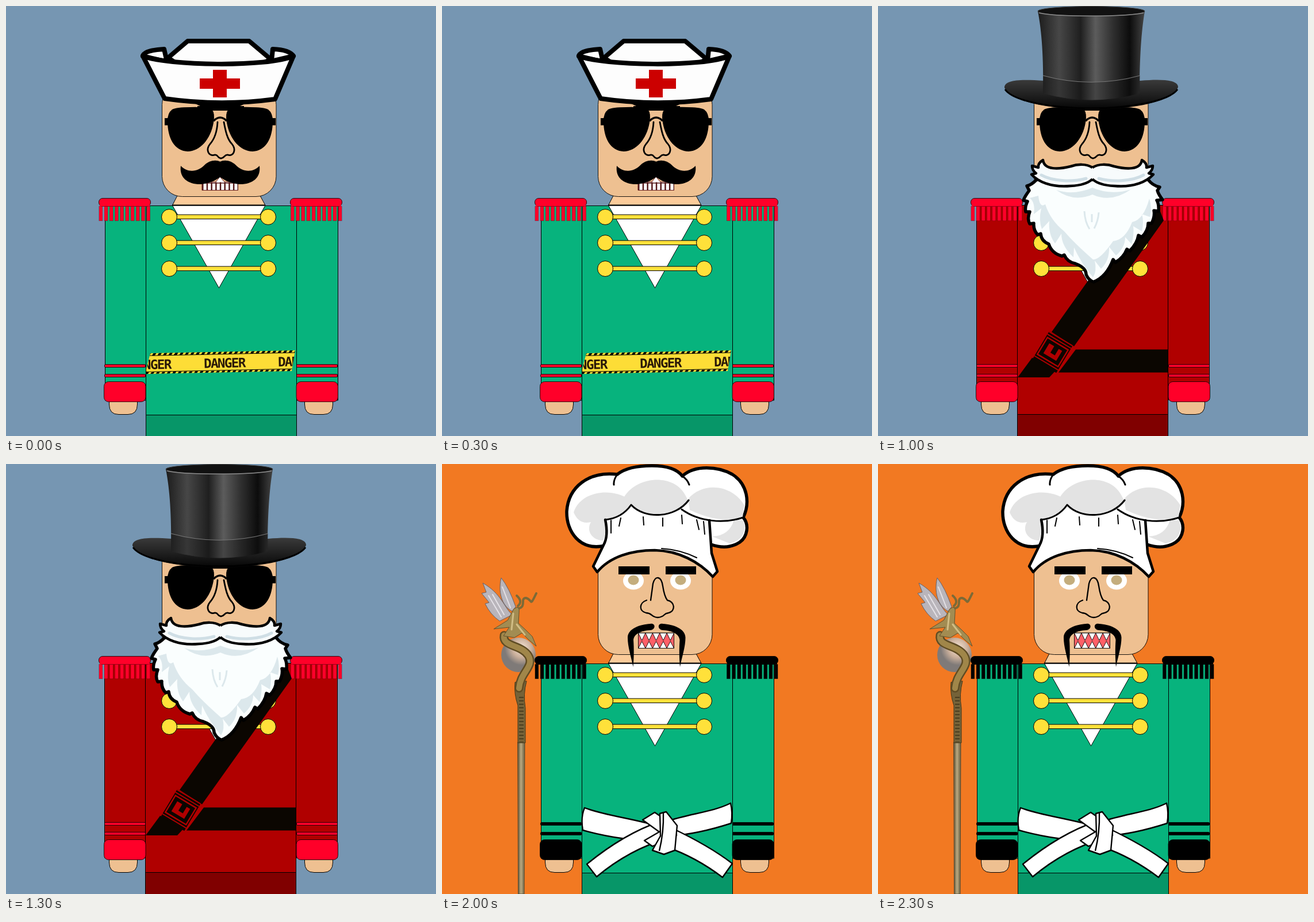
Write an HTML page that moves like this. It is 748 by 748 pixels and loops after 2500 ms.

```html
<!DOCTYPE html>
<html lang="en">
<head>
<meta charset="utf-8">
<title>Nutcracker outfits</title>
<style>
html,body{margin:0;width:100%;height:100%;overflow:hidden}
svg{display:block;width:100vw;height:100vh}
.scene{visibility:hidden;animation:show 2.5s step-end infinite;animation-delay:calc((var(--i) - 5)*.5s)}
@keyframes show{0%{visibility:visible}20%,100%{visibility:hidden}}
.green{--coat:#07b37d;--hem:#079668;--o:0px}
.red{--coat:#b00000;--hem:#800000;--o:-1px}
.scene{--trim:#ff0029}
.black{--trim:#000}
.cloth{transform:translate(var(--o),var(--o));fill:var(--coat)}
.hem{fill:var(--hem)}
.trim{fill:var(--trim)}
.fringe{stroke:var(--trim);stroke-width:25;stroke-dasharray:5.7 3.5}
.line{stroke:#000}
.skin{fill:#eec091}
.none{fill:none}
.tape text{font:bold 22.5px "DejaVu Sans Mono",monospace;letter-spacing:-1.6px;fill:#2a1908}
</style>
</head>
<body>
<svg viewBox="0 0 748 748">
<defs>
  <linearGradient id="silk">
    <stop offset="0" stop-color="#1c1c1c"/><stop offset=".2" stop-color="#474747"/>
    <stop offset=".4" stop-color="#1f1f1f"/><stop offset=".54" stop-color="#5c5c5c"/>
    <stop offset=".7" stop-color="#303030"/><stop offset=".86" stop-color="#0c0c0c"/>
    <stop offset="1" stop-color="#444"/>
  </linearGradient>
  <linearGradient id="brim" x2="0" y2="1">
    <stop offset="0" stop-color="#3a3a3a"/><stop offset=".6" stop-color="#1b1b1b"/><stop offset="1" stop-color="#050505"/>
  </linearGradient>
  <linearGradient id="wood">
    <stop offset="0" stop-color="#5d5236"/><stop offset=".45" stop-color="#b9a981"/><stop offset="1" stop-color="#6b5f40"/>
  </linearGradient>
  <radialGradient id="orb" cx=".6" cy=".3">
    <stop offset="0" stop-color="#f6e5d6"/><stop offset=".55" stop-color="#cbb09c"/><stop offset="1" stop-color="#7f7a78"/>
  </radialGradient>
  <clipPath id="tapeClip"><path d="M251 604 503 599 497 635 244 640V632Z"/></clipPath>

  <g id="shoulder">
    <path d="M161.5 361H251" class="none" stroke="#000" stroke-opacity=".45" stroke-width="26" stroke-dasharray="6.7 2.5"/>
    <path d="M162 361H250.6" class="none fringe"/>
    <rect x="161.5" y="334.5" width="90" height="14" rx="6.5" class="trim line" stroke-width=".8"/>
    <path d="M163 347H250" stroke-width="3" style="stroke:var(--trim)"/>
  </g>
  <g id="cuff" class="line">
    <path d="M179.5 686H228.5V693Q228.5 710.5 212 710.5H196Q179.5 710.5 179.5 693Z" class="skin"/>
    <g class="trim" stroke-width=".8">
      <rect x="171.5" y="623.5" width="71" height="5" rx="1.5"/>
      <rect x="171.5" y="640.5" width="71" height="5" rx="1.5"/>
      <rect x="170.5" y="653.5" width="72.5" height="35" rx="8"/>
    </g>
  </g>
  <g id="bar" class="line" fill="#ffe13a">
    <rect x="290" y="363" width="160" height="7.5"/>
    <circle cx="284" cy="367" r="13.5"/><circle cx="456" cy="367" r="13.5"/>
  </g>
  <g id="body">
    <g class="cloth line">
      <path d="M172.5 347.5H243.5V686H172.5ZM505.5 347.5H577.5V686H505.5Z"/>
      <rect x="243.5" y="347.5" width="262" height="402"/>
      <rect x="243.5" y="711.5" width="262" height="40" class="hem"/>
    </g>
    <use href="#cuff"/><use href="#cuff" transform="matrix(-1 0 0 1 748 0)"/>
    <use href="#shoulder"/><use href="#shoulder" transform="matrix(-1 0 0 1 746 0)"/>
    <path d="M298 330H442L451 346.5H289.5Z" fill="#fbcb9a" class="line"/>
    <path d="M289.5 347H451L370.5 490.5Z" fill="#fff" class="line"/>
    <path d="M289 346.5H451" class="line" stroke-width="2"/>
    <use href="#bar"/><use href="#bar" y="45"/><use href="#bar" y="90"/>
    <rect x="271.5" y="136.5" width="198.5" height="195" rx="35" class="skin line" stroke-width=".9"/>
  </g>

  <g id="lens">
    <path d="M289 180Q297 176 320 176Q348 175 358 180Q364 186 361 203C356 232 337 253 316 253C293 252 281 230 281 200Q281 186 289 180Z"/>
    <rect x="276" y="195" width="9" height="12.5"/>
  </g>
  <g id="shades">
    <use href="#lens"/><use href="#lens" transform="matrix(-1 0 0 1 745 0)"/>
    <path d="M333 174H414V180H387V182H358V180H333Z"/>
    <path d="M361 200Q372.5 188 384 200" class="none line" stroke-width="3.5"/>
  </g>
  <path id="longNose" class="none line" stroke-width="2.8" stroke-linecap="round" d="M368 202C367 222 362 232 355 240C347 250 352 262 363 259C369 258 368 265 374 265C380 265 380 258 386 259C396 262 401 250 393 240C385 232 382 218 379 202"/>
  <path id="roundNose" class="none line" stroke-width="2.3" stroke-linecap="round" d="M363 237L367 208Q370 197 376 198Q382 199 384 212C386 225 388 232 392 237C405 239 407 256 394 259C386 260 388 263 383 265Q375 269 368 265C363 262 362 259 355 259C342 256 343 241 356 237"/>
  <path id="curl" d="M373 271C364 266 352 270 346 276C333 290 315 290 304 278C301 300 318 311 340 310C357 308 367 302 373 297Z"/>
  <path id="droop" d="M362 278C372 276 372 288 363 289C345 290 334 296 333 306C334 320 334 337 332.5 353C329 335 323 318 323 302C323 286 345 279 362 278Z"/>
  <g id="droops"><use href="#droop"/><use href="#droop" transform="matrix(-1 0 0 1 746.5 0)"/></g>
  <g id="fangs" class="line" stroke-width=".9">
    <rect x="341.5" y="294" width="62" height="26.5" fill="#ff6068"/>
    <path fill="#fff" d="M341.5 294l6.2 13 6.2-13 6.2 13 6.2-13 6.2 13 6.2-13 6.2 13 6.2-13 6.2 13 6.2-13ZM341.5 320.5l6.2-12 6.2 12 6.2-12 6.2 12 6.2-12 6.2 12 6.2-12 6.2 12 6.2-12 6.2 12Z"/>
  </g>

  <g id="tape" class="tape" clip-path="url(#tapeClip)">
    <path d="M240 598H510V645H240Z" fill="#fddd36"/>
    <g transform="rotate(-1.2 380 620)">
      <text x="215" y="629">DANGER</text><text x="344" y="629">DANGER</text><text x="473" y="629">DANGER</text>
      <g class="line">
        <path d="M240 605.5H510M240 633.5H510" stroke-width="1"/>
        <path transform="skewX(-35)" d="M640 603H960M640 636.5H960" stroke-width="4.5" stroke-dasharray="5 4.5"/>
      </g>
    </g>
  </g>

  <g id="topHat">
    <path d="M220 142C220 129 245 127 288 130H456C500 126 522 130 522 141C514 167 440 180 371 180C300 180 228 166 220 142Z" fill="url(#brim)"/>
    <path d="M221 145C235 166 305 178 371 178C440 178 507 165 521 145" class="none" stroke="#000" stroke-width="3"/>
    <path d="M278 9C285 45 288 90 287 152Q371 175 455 152C455 90 458 45 464 9Z" fill="url(#silk)"/>
    <path d="M287 121Q371 144 456 121L455 152Q371 175 287 152Z" fill="#111" fill-opacity=".3"/>
    <path d="M287 121Q371 144 456 121" class="none" stroke="#777" stroke-width="1.2"/>
    <ellipse cx="371" cy="9" rx="93" ry="8.5" fill="#111" stroke="#444"/>
    <path d="M280 12C310 19 430 19 462 12" class="none" stroke="#8b8b8b" stroke-width="1.3"/>
  </g>

  <path id="brow" d="M307 197C312 181 327 176 345 184L344 187C329 182 318 186 307 197Z"/>
  <g id="specHalf" fill="#1f1f1f" stroke="#fff" stroke-width="3" paint-order="stroke">
    <path d="M241 133 237 124 251 125 245 114 262 119 258 109 274 117 273 112 290 111 300 135Z"/>
    <path fill-rule="evenodd" d="M239 168Q240 164 252 165L374 172V197Q363 198 362 222L348 231C338 257 310 260 290 255C265 250 254 222 249 184L241 181ZM268 177C267 205 274 230 291 238C307 244 333 243 340 233Q347 213 348 181Q310 170 268 177Z"/>
  </g>

  <g id="whiskers" class="line" stroke-width="4.5" stroke-linejoin="round">
    <path fill="#f7fbfc" d="M373 281C362 274 347 275 335 279C315 284 289 286 287 268Q278 273 279 281L268 278Q268 286 275 291L267 293C278 305 300 316 335 313C355 312 366 308 373 301"/>
    <path d="M284 294C305 306 340 306 362 300" class="none" stroke="#cfdee5" stroke-width="5" stroke-linecap="round"/>
  </g>
</defs>

<g class="scene green" style="--i:0">
  <path d="M0 0H748V748H0Z" fill="#7696b2"/>
  <use href="#body"/><use href="#tape"/>
  <use href="#longNose"/><use href="#shades"/>
  <path d="M341 306H365L372 297 380 306H403.5V320.5H341Z" fill="#fff" stroke="#6b1d1d"/>
  <path d="M341 313.5H404" stroke="#551a1a" stroke-width="14" stroke-dasharray="2.5 5.2"/>
  <path d="M341 308H403" stroke="#551a1a" stroke-width="1.5"/>
  <use href="#curl"/><use href="#curl" transform="matrix(-1 0 0 1 745 0)"/>
  <path d="M325 168H420L405 175H340Z"/>
  <g fill="#fdfdfd" class="line" stroke-width="8" stroke-linejoin="round">
    <path d="M282 90 316 61H423L461 93 440 102H300Z"/>
    <path d="M238 87Q240 77 275 75L280 97ZM462 96 464 75Q493 76 500 87Z"/>
    <path d="M238 87C280 104 455 107 500 87L468 162Q372 175 276 161Z"/>
  </g>
  <path d="M360 111H384V126H407V144H384V159H360V144H337V126H360Z" fill="#c00"/>
</g>

<g class="scene green" style="--i:1">
  <path d="M0 0H748V748H0Z" fill="#f27922"/>
  <use href="#body"/>
  <use href="#droops"/><use href="#roundNose"/>
  <g fill="#fff"><ellipse cx="332" cy="203" rx="18" ry="16"/><ellipse cx="414" cy="203" rx="18" ry="16"/></g>
  <g fill="#2b1219" stroke="#8d7b76" stroke-width="2"><ellipse cx="332.5" cy="202" rx="9.5" ry="8.5"/><ellipse cx="414.5" cy="202" rx="9.5" ry="8.5"/></g>
  <use href="#brow"/><use href="#brow" transform="matrix(-1 0 0 1 747 0)"/>
  <path d="M491.5 185H501.5V437H491.5Z" fill="#fcdccb"/>
  <use href="#specHalf"/><use href="#specHalf" transform="matrix(-1 0 0 1 748 0)"/>
  <path d="M371 174H377V196H371Z" fill="#1f1f1f"/>
  <use href="#topHat"/>
  <ellipse cx="373" cy="276.5" rx="59.5" ry="55.5" fill="#e93c52"/>
  <path d="M357 223C329 252 340 305 385 331C346 336 314 309 314 276C314 250 333 228 357 223Z" fill="#b42f41"/>
  <ellipse cx="389" cy="256" rx="22" ry="20" fill="#da756f"/>
  <ellipse cx="373" cy="276.5" rx="59.5" ry="55.5" class="none" stroke="#fff" stroke-width="2"/>
  <path d="M244 628C320 646 430 649 501 634L499 641C430 660 315 655 244 636Z" fill="#7a787b"/>
  <path d="M248 587C320 602 430 603 504 594Q503 620 499 636C430 653 315 648 244 630Q242 605 248 587Z" fill="#4b484c"/>
  <rect x="357" y="591" width="71" height="64" rx="9" fill="#f0c65c"/>
  <rect x="359" y="592" width="67" height="60" rx="8" fill="#e0b536"/>
  <rect x="372.5" y="603.5" width="41" height="36.5" rx="5" fill="#4b484c" stroke="#3d3522" stroke-width="1.5"/>
  <path d="M415 619H404Q399 619 399 623.5T404 628H415Z" fill="#e9c047"/>
  <g fill="#29272a"><circle cx="320.5" cy="621" r="4"/><circle cx="342.5" cy="622" r="4"/><circle cx="445" cy="624" r="4"/></g>
</g>

<g class="scene red" style="--i:2">
  <path d="M0 0H748V748H0Z" fill="#7696b2"/>
  <use href="#body"/>
  <g fill="#0b0601">
    <path d="M302 567 457 349 487 347 497 373 341 592ZM344 597.5H504V637.5H314ZM268 612 312 631 298 646H243Z"/>
    <g transform="translate(304 602) rotate(31)">
      <path d="M-24 -28H24V28H-24Z"/>
      <path d="M-24 -27H24M-24 -22H24M-24 22H24" stroke="#b00000" stroke-width="2"/>
      <path d="M-21 -17H21V17H-21Z" class="none" stroke="#b00000" stroke-width="2.5"/>
      <path d="M-13 -10H13V10H-13Z" fill="#b00000"/>
      <path d="M-3 -11H6V3H-3Z"/>
    </g>
  </g>
  <use href="#longNose"/><use href="#shades"/>
  <use href="#topHat"/>
  <path class="line" stroke-width="5.5" stroke-linejoin="round" fill="#fafefe" d="M276 302Q266 312 259 313L263 321Q255 332 253 338L260 340Q255 350 257 358L264 358Q259 370 264 379L271 378Q270 390 278 398L283 396Q284 409 297 414Q302 430 320 435L324 433Q329 445 343 448Q362 455 362 467Q366 477 375 480C393 473 403 457 409 441L413 446Q427 438 433 423L438 426Q451 413 453 399L459 402Q470 391 470 378L476 378Q482 366 480 356L488 357Q489 345 485 338L495 337Q488 328 486 321L490 315Q477 312 470 302Z"/>
  <g fill="#dce8ec">
    <path d="M264 334Q274 342 271 362L284 352Q279 372 285 388L298 374Q296 397 308 413L319 396Q319 418 340 437L341 420Q353 447 374 472Q381 462 377 443L388 457Q403 443 402 419L414 434Q430 420 430 402L441 414Q446 397 444 383L459 392Q463 375 459 362L473 367Q477 351 472 335Q462 372 442 376Q430 407 409 409Q386 442 374 441Q341 412 324 392Q300 373 291 345Q281 352 279 330Z"/>
    <path d="M310 320Q340 330 373 316Q405 330 440 319Q406 343 373 328Q340 342 310 320Z"/>
  </g>
  <path d="M359 357Q360 376 368 388M384 359Q383 374 376 387M372 362V376" class="none" stroke="#dce8ec" stroke-width="3"/>
  <use href="#whiskers"/><use href="#whiskers" transform="matrix(-1 0 0 1 746 0)"/>
</g>

<g class="scene red" style="--i:3">
  <path d="M0 0H748V748H0Z" fill="#dff2b0"/>
  <use href="#body"/><use href="#tape"/>
  <ellipse cx="373" cy="242" rx="32" ry="15.5" fill="#e7b98a"/>
  <g fill="#70291b" stroke="#48180f"><ellipse cx="359" cy="242" rx="6.5" ry="8"/><ellipse cx="387" cy="242" rx="6.5" ry="8"/></g>
  <use href="#shades"/><use href="#fangs"/><use href="#droops"/>
  <path d="M287 140V103C287 57 325 29.5 368 29.5S449 57 449 103V140Q368 168 287 140Z" fill="#1f1f1d"/>
  <path d="M287 121Q368 147 449 121V137Q368 164 287 137Z" fill="#e8111a"/>
  <path d="M266 139C266 131 277 130 285 135Q368 164 451 135C459 130 470 131 470 140C470 149 461 154 449 160Q415 174.5 368 174.5T287 160C274 154 266 149 266 139Z" fill="#1f1f1d"/>
</g>

<g class="scene green black" style="--i:4">
  <path d="M0 0H748V748H0Z" fill="#f27922"/>
  <g stroke-linejoin="round" stroke-linecap="round">
    <path d="M132 484H144L143 748H133Z" fill="url(#wood)" stroke="#51472f"/>
    <path d="M127 380Q125 400 132 420V485H145V425Q141 400 147 378Z" fill="#756238" stroke="#433719"/>
    <path d="M138 405V484" stroke="#4a3d20" stroke-width="8" stroke-dasharray="2 4" stroke-linecap="butt"/>
    <circle cx="133" cy="332" r="30" fill="url(#orb)"/>
    <g class="none">
      <path id="snake" d="M108 298C104 318 138 314 150 333C162 352 136 362 134 390" stroke="#5f4c24" stroke-width="15"/>
      <path d="M108 298C104 318 138 314 150 333C162 352 136 362 134 390" stroke="#a08649" stroke-width="10"/>
    </g>
    <g fill="#b9b5bb" stroke="#65626a"><path d="M122 262C108 250 104 226 71 207L77 223 69 225 82 241 75 243Q84 262 100 273Z"/><path d="M122 256C108 250 96 228 103 198Q117 216 128 248Z"/></g>
    <path d="M88 227 108 262M81 229 103 266M105 214 119 250" stroke="#e4e1e6" stroke-width="2"/>
    <path d="M129 252C150 250 134 234 146 233C158 236 152 250 164 225M132 247Q141 239 130 229" class="none" stroke="#7c6a37" stroke-width="4"/>
    <path d="M125 252Q136 244 134 259L133 277 146 289 157 300 164 317 151 306 139 294 126 302 107 299 117 284 90 287 114 272Z" fill="#a28c52" stroke="#63502b"/>
    <path d="M124 260 121 288M130 279 144 297" class="none" stroke="#d1bd85" stroke-width="3"/>
  </g>
  <use href="#body"/>
  <g fill="#fff" class="line" stroke-width="2.4" stroke-linejoin="round">
    <path d="M248 598C285 612 325 615 385 632L370 655C330 655 285 648 245 637Q241 615 248 598Z"/>
    <path d="M502 590C470 606 430 608 390 622L398 647C440 644 475 634 503 625Q506 606 502 590Z"/>
    <path d="M379 622C335 637 290 665 252 696L269 718C305 688 345 665 391 652Z"/>
    <path d="M399 633C435 650 475 672 505 695L488 719C455 694 425 678 390 666Z"/>
    <path d="M349 619 370 606 408 632 405 652 378 640Z"/>
    <path d="M352 655 383 637 405 625 408 646 366 665Z"/>
    <path d="M379 608 390 605 409 629 405 672 386 679 366 672 380 647Z"/>
    <path d="M385 607Q386 640 378 673" class="none"/>
  </g>
  <g fill="#fff"><ellipse cx="333" cy="203" rx="18" ry="15.5"/><ellipse cx="415" cy="203" rx="18" ry="15.5"/></g>
  <g fill="#c4ad7d"><ellipse cx="333" cy="202" rx="9.5" ry="8.5"/><ellipse cx="415" cy="202" rx="9.5" ry="8.5"/></g>
  <path d="M307 178H361V192H307ZM389 178H442V192H389Z"/>
  <use href="#roundNose"/><use href="#fangs"/><use href="#droops"/>
  <g fill="#fff" class="line" stroke-width="5.5" stroke-linejoin="round" stroke-linecap="round">
    <path d="M284 142C240 152 216 118 217 82C220 40 255 12 305 18C320 6 345 3 365 3C395 3 410 10 418 21C440 1 480 4 505 18C532 35 536 68 524 93C535 106 531 127 518 136C503 146 485 146 468 140Z"/>
    <g fill="#e3e3e3" stroke="none">
      <path d="M229 84C240 50 290 38 327 62L330 74Q312 94 283 97Q287 120 280 133C262 133 250 117 259 101Q238 106 229 84Z"/>
      <path d="M317 57C340 20 402 17 422 52L429 65C404 94 350 95 329 70Z"/>
      <path d="M428 61C455 29 506 37 526 72L523 92Q484 105 431 80ZM470 126Q500 125 508 97L524 98C531 117 522 134 500 138Z"/>
    </g>
    <path d="M284 97Q290 125 281 141L263 178 270 188C292 161 330 150 370 150C412 151 447 170 471 196L479 187 469 155 465 98C420 85 330 85 284 97Z" stroke="none"/>
    <path class="none" stroke-width="4.5" d="M284 97Q290 125 281 141L263 178 270 188C292 161 330 150 370 150C412 151 447 170 471 196L479 187 469 155 465 98"/>
    <path class="none" stroke-width="3" d="M284 97Q313 94 329 71C353 97 406 94 429 63M417 79C448 101 490 104 524 93M305 18Q298 28 299 36M418 21Q427 27 430 36"/>
    <path class="none" stroke-width="2" d="M294 98V120M311 94 308 108M350 92 351 106M384 94V108M417 89 418 104M443 97 447 114M455 100 457 122M382 147Q415 149 443 163"/>
  </g>
</g>
</svg>
</body>
</html>
```
